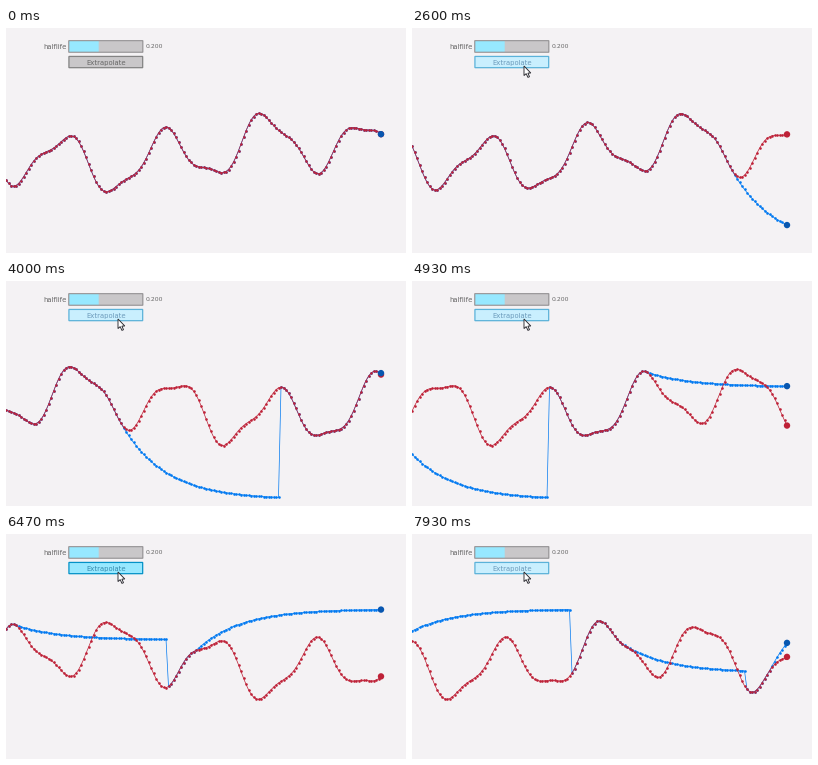
Recreate the animation shown at these times as a matplotlib script. Size 400 px wide and 225 px high, loop 8000 ms.

```python
import numpy as np
import matplotlib.pyplot as plt
from matplotlib.animation import FuncAnimation
from matplotlib.patches import Circle, Polygon, Rectangle

W, H, DPI = 400, 225, 100
FRAMES, LOOP = 121, 8000
PX = 72 / DPI            # one pixel in points
SPEED = 150              # pixels scrolled per second of signal
STEP, HEAD = 2.5, 150    # pixels per sample, samples left of the head
RATE = 3.9225            # samples per frame
DECAY = 0.2 / np.log(2) * SPEED   # half-life of 0.2 s, in pixels

BG = "#f4f2f4"
MAROON, BLUE, DARK = "#be2137", "#0079f1", "#0857b0"
GRAY, EDGE, LABEL = "#c9c7c9", "#838383", "#686868"
BUTTON = {  # fill, edge, text
    "normal": (GRAY, EDGE, LABEL),
    "focus": ("#c9effe", "#5bb2d9", "#6c9bbc"),
    "press": ("#97e8ff", "#0492c7", "#368baf"),
}

# Extrapolations: first sample, last sample, resting height
RUNS = [(130, 194, 218.4), (234, 294, 105.7), (306, 380, 75),
        (401, 450, 138.5), (460, 999, 53)]
TOGGLES = [n for run in RUNS for n in run[:2]]


def wave(x, size, hertz, crest):
    return size * np.cos(2 * np.pi * hertz * (x - crest) / SPEED)


def signal_at(x):
    return (125.2 + wave(x, 12.5, 0.4, 97) - wave(x, 26, 1.5, 58.6)
            + wave(x, 6.6, 3.4, 93.3))


def head_step(frame):
    return int(RATE * frame + 0.4)


total = head_step(FRAMES) + HEAD + 1
xs = STEP * np.arange(total)
signal = signal_at(xs)
guess = signal.copy()
for first, last, rest in RUNS:
    a, b = first + HEAD, min(last + HEAD + 1, total)
    fade = np.exp(-(xs[a:b] - xs[a]) / DECAY)
    guess[a:b] = rest + (signal[a] - rest) * fade

fig = plt.figure(figsize=(W / DPI, H / DPI), dpi=DPI, facecolor=BG)
ax = fig.add_axes([0, 0, 1, 1])
ax.set_xlim(0, W)
ax.set_ylim(H, 0)
ax.axis("off")


def box(x, y, w, h, fill, edge="none", lw=0.0):
    return ax.add_patch(Rectangle((x + lw / 2, y + lw / 2), w - lw, h - lw,
                                  fc=fill, ec=edge, lw=lw * PX,
                                  joinstyle="miter", snap=False))


def label(x, y, text, align, size=6.85):
    return ax.text(x, y, text, ha=align, va="center_baseline", color=LABEL,
                   fontsize=size * PX, family="DejaVu Sans")


def dotted(color, z):
    return ax.plot([], [], color=color, lw=0.7 * PX, marker="o",
                   ms=2.6 * PX, mew=0, zorder=z, snap=False)[0]


def ball(color, z):
    return ax.add_patch(Circle((W - 25, 0), 3.2, fc=color, ec="none", zorder=z))


box(62.3, 12.2, 75, 12.5, GRAY)
box(63, 13, 29.7, 11, "#97e8ff")
box(62.3, 12.2, 75, 12.5, "none", "#908e90", 1)
button = box(62.3, 27.8, 75, 12.5, GRAY, EDGE, 1.25)
label(60.3, 18.3, "halflife", "right")
label(139.5, 18.3, "0.200", "left", 6.1)
caption = label(99.8, 34, "Extrapolate", "center")

blue_line, red_line = dotted(BLUE, 3), dotted(MAROON, 4)
red_ball, blue_ball = ball(MAROON, 5), ball(DARK, 6)

ARROW = np.array([(0, 0), (0, 9.6), (2.2, 7.6), (3.9, 11.4), (5.5, 10.7),
                  (3.9, 7.1), (6.8, 7)])
cursor = ax.add_patch(Polygon(ARROW, fc="white", ec="#26262c", lw=0.9 * PX,
                              zorder=8))


def pointer(frame):
    t = np.clip((frame - 18) / 7, 0, 1)
    t = t * t * (3 - 2 * t)
    return np.array([385 - 273 * t, 93 - 55 * t])


def update(frame):
    n = head_step(frame)
    view = slice(n, n + HEAD + 1)
    x = xs[view] - n * STEP
    red_line.set_data(x, signal[view])
    blue_line.set_data(x, guess[view])
    red_ball.center = (W - 25, signal[n + HEAD])
    blue_ball.center = (W - 25, guess[n + HEAD])

    tip = pointer(frame)
    cursor.set_visible(frame >= 17)
    cursor.set_xy(ARROW + tip)

    over = 62 <= tip[0] <= 137.5 and 27.8 <= tip[1] <= 40.3
    down = any(k - 4 < n <= k for k in TOGGLES)
    state = "press" if over and down else "focus" if over else "normal"
    fill, edge, ink = BUTTON[state]
    button.set_facecolor(fill)
    button.set_edgecolor(edge)
    caption.set_color(ink)
    return red_line, blue_line, red_ball, blue_ball, cursor, button, caption


anim = FuncAnimation(fig, update, frames=FRAMES, interval=LOOP / FRAMES,
                     repeat=True, repeat_delay=0, blit=False)
plt.show()
```
